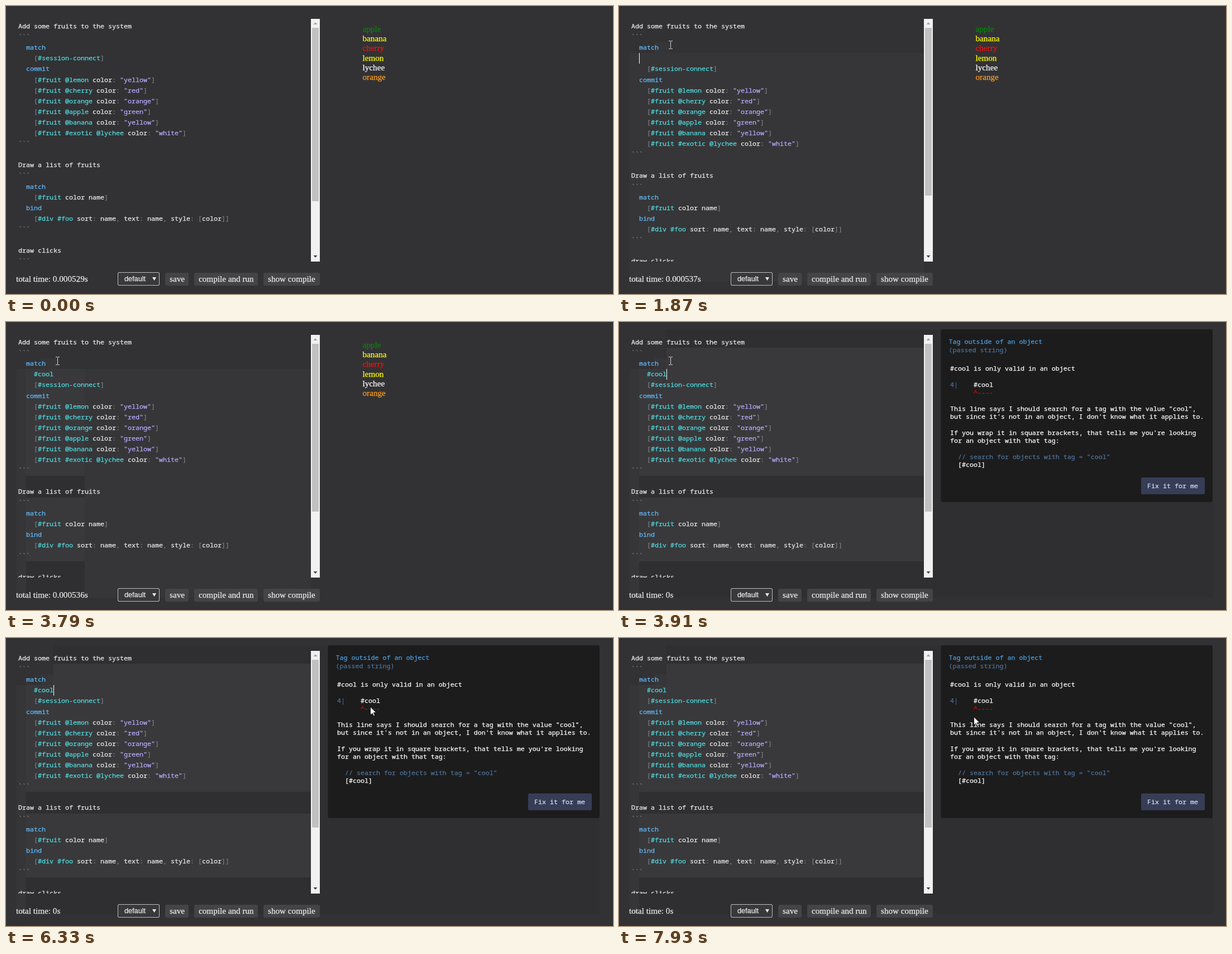
These frames come from a looping animation (1087x515 px, 8 s). An HTML page with a canvas:

```html
<!DOCTYPE html>
<html lang="en">
<head>
<meta charset="utf-8">
<title>Live editor with helpful errors</title>
<style>
  html, body { margin: 0; width: 100%; height: 100%; overflow: hidden; background: #323234; }
  canvas { display: block; width: 1087px; height: 515px; }
</style>
</head>
<body>
<canvas id="stage" width="1087" height="515"></canvas>
<script>
const ctx = document.getElementById('stage').getContext('2d');
const LOOP = 8000, CHAR = 7, LINE = 19.1, LEFT = 22;
const MONO = '11.667px "Noto Sans Mono", monospace';
const SERIF = '15.2px "Liberation Serif", serif';
const SANS = '12.667px "Liberation Sans", sans-serif';
const PLAIN = '#ececec', KEYWORD = '#62b8fa', TAG = '#50dce2', STRING = '#b8aaff', PUNCT = '#7e7e80';

const program = `Add some fruits to the system
\`\`\`
  match
    [#session-connect]
  commit
    [#fruit @lemon color: "yellow"]
    [#fruit @cherry color: "red"]
    [#fruit @orange color: "orange"]
    [#fruit @apple color: "green"]
    [#fruit @banana color: "yellow"]
    [#fruit #exotic @lychee color: "white"]
\`\`\`

Draw a list of fruits
\`\`\`
  match
    [#fruit color name]
  bind
    [#div #foo sort: name, text: name, style: [color]]
\`\`\`

draw clicks
\`\`\``.split('\n');

const fruits = [['apple', '#0b820b'], ['banana', '#ffff00'], ['cherry', '#fa0f0f'],
  ['lemon', '#ffff00'], ['lychee', '#ffffff'], ['orange', '#ffa01e']];

// [start, new line's text (null = not inserted yet), total time]
const edits = [
  [0, null, '0.000529'], [1870, '  ', '0.000537'],
  [2020, '   ', '0.000541'], [2140, '    ', '0.000612'], [2260, '    ', '0.000544'],
  [2510, '    #', '0.000551'], [2630, '    #', '0.000539'], [2750, '    #c', '0.000548'],
  [2910, '    #co', '0.000533'], [3030, '    #coo', '0.000541'], [3180, '    #coo', '0.000612'],
  [3330, '    #cool', '0.000536'], [3910, '    #cool', '0'],
];

// [start, shape, x, y]
const pointer = [
  [0, 'none'], [530, 'beam', 34, 142], [650, 'beam', 66, 101],
  [800, 'beam', 80, 78], [920, 'beam', 92, 70], [5120, 'beam', 94, 70],
  [5270, 'beam', 198, 42], [5390, 'beam', 362, 50], [5510, 'beam', 487, 82],
  [5630, 'arrow', 568, 101], [5780, 'arrow', 631, 113], [5910, 'none'],
  [6050, 'arrow', 635, 116], [6330, 'arrow', 652, 122], [6460, 'arrow', 672, 130],
  [6580, 'arrow', 682, 132], [6730, 'arrow', 684, 132], [7350, 'arrow', 679, 135],
  [7500, 'arrow', 658, 139], [7620, 'arrow', 642, 140], [7930, 'arrow', 635, 140],
];

const caretOn = [[1070, 1590], [1870, 3790], [3910, 4340], [4990, 5390],
  [5910, 6460], [7040, 7500]];

const current = (list, t) => list.filter(step => step[0] <= t).pop();

function rect(color, left, top, right, bottom, radius = 0) {
  ctx.fillStyle = color;
  ctx.beginPath();
  ctx.roundRect(left, top, right - left, bottom - top, radius);
  ctx.fill();
}

// A hairline stroke gives the slightly heavy weight of screen-hinted text.
function text(string, x, baseline, color, font = MONO) {
  const y = Math.round(baseline);
  ctx.font = font;
  ctx.fillStyle = ctx.strokeStyle = color;
  ctx.lineWidth = 0.25;
  ctx.fillText(string, x, y);
  ctx.strokeText(string, x, y);
}

function polygon(color, ...points) {
  ctx.fillStyle = color;
  ctx.beginPath();
  points.forEach(([x, y]) => ctx.lineTo(x, y));
  ctx.closePath();
  ctx.fill();
}

function tokenColor(token, line) {
  if (/^ {2}\w+$/.test(line)) return KEYWORD;
  if (/^[#@]/.test(token)) return TAG;
  if (token[0] === '"') return STRING;
  return /^[[\]:,`]/.test(token) ? PUNCT : PLAIN;
}

function codeLine(line, row) {
  for (const match of line.matchAll(/[#@][\w-]*|"[^"]*"|[[\]:,`]+|\w+/g))
    text(match[0], LEFT + match.index * CHAR, 40 + row * LINE, tokenColor(match[0], line));
}

// Block shading shows up as parts of the screen get repainted.
function shading(t) {
  const blocks = (left, right, top) => {
    rect('#2f2f31', left, top, right, 493);
    rect('#39393b', left, Math.max(top, 46), Math.min(right, 546), 275);
    rect('#39393b', left, 314, Math.min(right, 546), 428);
  };
  if (t >= 920) rect('#363638', 63, 65, 93, 84);
  if (t >= 1870) rect('#363638', 19, 84, 546, 493);
  if (t >= 2020) blocks(36, 141, 84);
  if (t >= 3910) blocks(85, 1063, 13);
}

function editor(inserted) {
  const lines = program.slice();
  if (inserted !== null) lines.splice(3, 0, inserted);
  ctx.save();
  ctx.beginPath();
  ctx.rect(18, 23, 528, 434);
  ctx.clip();
  lines.forEach(codeLine);
  ctx.restore();

  rect('#f1f1f1', 546, 23, 562, 457);
  rect('#c1c1c1', 548, 39, 560, inserted === null ? 349 : 339);
  polygon('#a3a3a3', [550.5, 33], [554, 29], [557.5, 33]);
  polygon('#404040', [550.5, 446], [554, 450], [557.5, 446]);
}

function toolbar(total) {
  text(`total time: ${total}s`, 18, 493, PLAIN, SERIF);
  rect('#bdbdbd', 200, 476, 275, 500, 3);
  rect('#39393b', 201, 477, 274, 499, 2);
  text('default', 212, 492, PLAIN, SANS);
  polygon(PLAIN, [262, 485], [269, 485], [265.5, 491]);
  for (const [label, left, right, x] of [['save', 285, 327, 293],
    ['compile and run', 337, 451, 345], ['show compile', 461, 562, 469]]) {
    rect('#444446', left, 477, right, 500, 3);
    text(label, x, 493, PLAIN, SERIF);
  }
}

function errorPanel() {
  const DIM = '#4f7298', BRIGHT = '#ffffff';
  const message = [
    [0, 593, '#cool is only valid in an object', BRIGHT],
    [2, 593, '4|', DIM], [2, 635, '#cool', BRIGHT],
    [3, 635, '^----', '#ff0000'],
    [5, 593, 'This line says I should search for a tag with the value "cool",', BRIGHT],
    [6, 593, "but since it's not in an object, I don't know what it applies to.", BRIGHT],
    [8, 593, "If you wrap it in square brackets, that tells me you're looking", BRIGHT],
    [9, 593, 'for an object with that tag:', BRIGHT],
    [11, 607, '// search for objects with tag = "cool"', DIM],
    [12, 607, '[#cool]', BRIGHT],
  ];
  rect('#1c1c1d', 576.5, 13, 1063, 322, 3);
  text('Tag outside of an object', 590.5, 39, '#4f9fe0');
  text('(passed string)', 590.5, 54, DIM);
  for (const [row, x, string, color] of message) text(string, x, 87 + row * 14.33, color);
  rect('#373d56', 935, 278, 1049, 308, 2);
  text('Fix it for me', 946, 297, '#cfe2fa');
}

function caret(t, inserted) {
  if (!caretOn.some(([from, to]) => t >= from && t < to)) return;
  const x = inserted === null ? 71 : LEFT + inserted.length * CHAR;
  const y = inserted === null ? 65 : 84;
  rect('#ffffff', x, y, x + 1, y + 19);
}

function drawPointer([, shape, x, y]) {
  if (shape === 'beam') {
    rect('#d8d8d8', x, y - 7, x + 1, y + 6);
    for (const end of [y - 8, y + 6]) {
      rect('#d8d8d8', x - 3, end, x, end + 1);
      rect('#d8d8d8', x + 1, end, x + 4, end + 1);
    }
  } else if (shape === 'arrow') {
    const outline = [[0, 0], [0, 17], [4, 13.5], [6, 18], [9, 17], [7, 12], [12, 12]];
    const inside = [[1, 2], [1, 15], [4.2, 12], [6.6, 17], [8, 16.4], [5.8, 11], [10, 11]];
    const at = points => points.map(([dx, dy]) => [x + dx, y + dy]);
    polygon('#101010', ...at(outline));
    polygon('#ffffff', ...at(inside));
  }
}

function draw(t) {
  const [, inserted, total] = current(edits, t);
  rect('#323234', 0, 0, 1087, 515);
  shading(t);
  editor(inserted);
  toolbar(total);
  if (t >= 3910) errorPanel();
  else fruits.forEach(([name, color], i) => text(name, 638.5, 46 + i * 17.2, color, SERIF));
  caret(t, inserted);
  drawPointer(current(pointer, t));
}

const start = performance.now();
function tick() {
  draw((performance.now() - start) % LOOP);
  requestAnimationFrame(tick);
}
tick();
</script>
</body>
</html>
```
